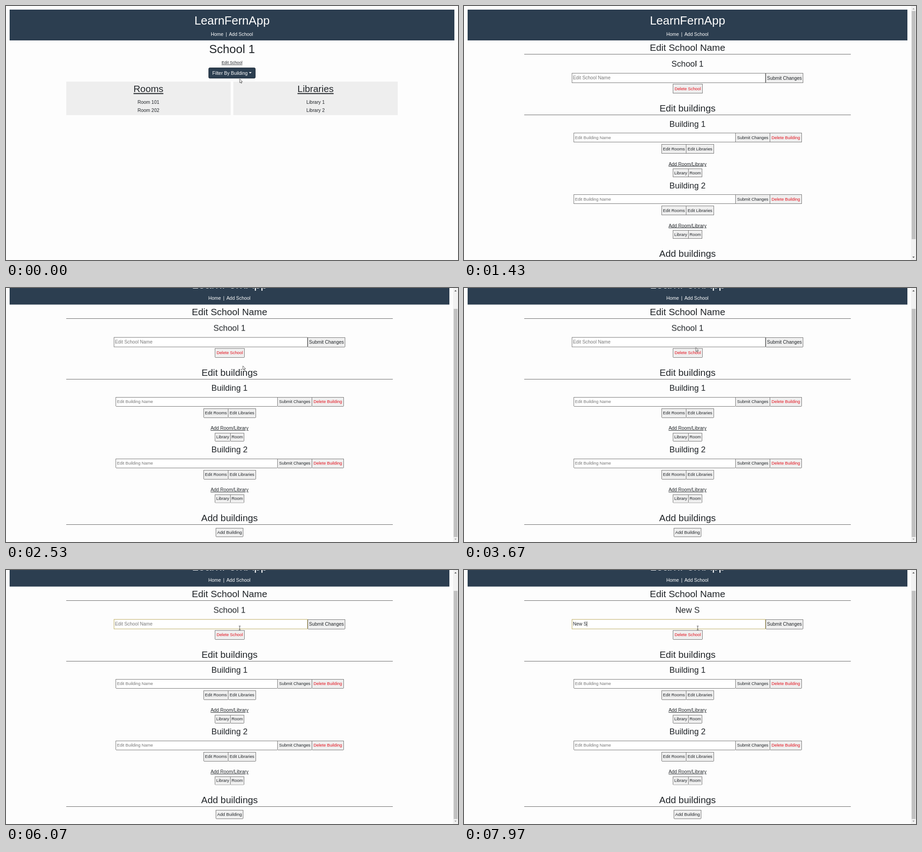
Animation of 998x561 px, one loop 8 s. Source, as an HTML page:

```html
<!DOCTYPE html>
<html lang="en">
<head>
<meta charset="utf-8">
<title>School editor</title>
<style>
  html, body { margin: 0; width: 100%; height: 100%; overflow: hidden; background: #fdfdfd; }
  svg { display: block; }
  text { font-family: "Liberation Sans", Arial, sans-serif; fill: #212529; white-space: pre; }
  .light { fill: #fff; }
  .red { fill: #e3101c; }
  .hint { fill: #757575; }
  .under { text-decoration: underline; }
  .bar { fill: #2c3e50; }
  .panel { fill: #eee; }
  .rule { fill: #666; shape-rendering: crispEdges; }
  .btn, .field { fill: #efefef; stroke: #767676; shape-rendering: crispEdges; }
  .field { fill: #fff; }
  .status text { font-family: "Open Sans", "Noto Sans", sans-serif; fill: #55585c; }

  /* Every part runs on the same 8 s loop. */
  .first, .second, .link, .status, .arrow, .beam, .focus, .blink, .strip, .up, .down {
    animation: 8s step-end infinite;
  }
  .first { animation-name: first; }
  .second { animation-name: second; }
  .link { animation-name: link; }
  .status { animation-name: status; }
  .arrow { animation-name: arrow; }
  .beam { animation-name: beam; }
  .focus { animation-name: focus; }
  .blink { animation-name: blink; }
  .strip { animation-name: type; }
  .up { animation-name: up; }
  .down { animation-name: down; }
  .scroll { animation: scroll 8s ease-in-out infinite; }
  .thumb { animation: thumb 8s ease-in-out infinite; }
  .cursor { animation: move 8s ease-in-out infinite; }

  @keyframes first { 0% { visibility: visible } 16.9%, 100% { visibility: hidden } }
  @keyframes second { 0% { visibility: hidden } 16.9%, 100% { visibility: visible } }
  @keyframes link { 0% { fill: #212529 } 8%, 100% { fill: #c6b588 } }
  @keyframes status { 0% { visibility: hidden } 8.8% { visibility: visible } 16.9%, 100% { visibility: hidden } }
  @keyframes arrow { 0% { opacity: 1 } 8% { opacity: 0 } 30% { opacity: 1 } 46.9%, 100% { opacity: 0 } }
  @keyframes beam { 0% { opacity: 0 } 8% { opacity: 1 } 30% { opacity: 0 } 46.9%, 100% { opacity: 1 } }
  @keyframes focus { 0% { stroke: #767676 } 66.25%, 100% { stroke: #bcaa5c } }
  @keyframes blink { 0% { opacity: 0 } 66.25% { opacity: 1 } 72.5% { opacity: 0 } 78.75%, 100% { opacity: 1 } }
  @keyframes type {
    0% { transform: translateY(0) }
    83.75% { transform: translateY(-40px) }
    86.25% { transform: translateY(-80px) }
    89.4% { transform: translateY(-120px) }
    92.5% { transform: translateY(-160px) }
    96.9%, 100% { transform: translateY(-200px) }
  }
  @keyframes up { 0% { fill: #a3a3a3 } 29.2%, 100% { fill: #505050 } }
  @keyframes down { 0% { fill: #505050 } 31.4%, 100% { fill: #a3a3a3 } }
  @keyframes scroll { 0%, 29.1% { transform: translateY(0) } 31.4%, 100% { transform: translateY(-39.4px) } }
  @keyframes thumb { 0%, 29.1% { transform: translateY(0) } 31.4%, 100% { transform: translateY(35px) } }
  @keyframes move {
    0%, 2.5% { transform: translate(516px, 161px) }
    8.75% { transform: translate(513px, 127px) }
    14%, 17.5% { transform: translate(512.5px, 126px) }
    26.9%, 28% { transform: translate(523px, 170px) }
    31.4%, 38% { transform: translate(523px, 172px) }
    47.5% { transform: translate(511px, 129px) }
    57%, 62% { transform: translate(510.5px, 124px) }
    66.25%, 100% { transform: translate(516px, 128px) }
  }
</style>
</head>
<body>
<svg id="stage" width="998" height="561" viewBox="0 0 998 561"></svg>
<script>
const stage = document.getElementById('stage');
const BODY = 10.4, SMALL = 9.36, H1 = 26, H2 = 20.8, H3 = 18.2;
const typed = ['N', 'Ne', 'New', 'New ', 'New S'];

const rect = (x, y, w, h, cls, more = '') =>
  `<rect x="${x}" y="${y}" width="${w}" height="${h}" class="${cls}" ${more}/>`;
const text = (x, y, size, str, cls = '', anchor = 'start') =>
  `<text x="${x}" y="${y}" font-size="${size}" class="${cls}" text-anchor="${anchor}">${str}</text>`;
const mid = (x, y, size, str, cls) => text(x, y, size, str, cls, 'middle');

// Bordered box given by its outer edges, with a centred label
const button = (x1, y1, x2, y2, label, size = SMALL, cls = '') =>
  rect(x1 + .5, y1 + .5, x2 - x1 - 1, y2 - y1 - 1, 'btn', 'rx="1"') +
  mid((x1 + x2) / 2, (y1 + y2) / 2 + size * .355, size, label, cls);
const field = (x1, y1, x2, y2, cls = '') =>
  rect(x1 + .5, y1 + .5, x2 - x1 - 1, y2 - y1 - 1, 'field ' + cls, 'rx="1"');

const header = (width, cx) =>
  rect(8, 8, width, 68, 'bar') +
  mid(cx, 40.7, H1, 'LearnFernApp', 'light') +
  text(cx - 46.8, 65.5, BODY, 'Home', 'light') +
  mid(cx - 12.7, 65.5, BODY, '|', 'light') +
  text(cx - 6.8, 65.5, BODY, 'Add School', 'light');

const panel = (x, title, rows) =>
  rect(x, 167, 363, 74, 'panel') +
  mid(x + 181.5, 190.4, H2, title, 'under') +
  rows.map((row, i) => mid(x + 181.5, 215.7 + 18.7 * i, BODY, row)).join('');

const schoolPage = () =>
  header(982, 499) +
  mid(499, 104, H1, 'School 1') +
  mid(499, 128.4, 9.1, 'Edit School', 'under link') +
  rect(447.5, 136.5, 103, 23, 'bar', 'rx="2.6" stroke="#25303c"') +
  text(455.5, 151.7, BODY, 'Filter By Building', 'light') +
  '<path d="M536.4 146h6l-3 3z" fill="#fff"/>' +
  panel(133, 'Rooms', ['Room 101', 'Room 202']) +
  panel(502, 'Libraries', ['Library 1', 'Library 2']);

const section = (y, title) =>
  mid(493.5, y, H2, title) + rect(133, y + 7, 721, 1, 'rule');

const building = (n, y) => `<g transform="translate(0 ${y})">` +
  mid(493.5, 266.5, H3, 'Building ' + n) +
  field(242, 280, 600, 301) +
  text(245, 293.8, SMALL, 'Edit Building Name', 'hint') +
  button(599, 280, 676, 301, 'Submit Changes') +
  button(675, 280, 746, 301, 'Delete Building', SMALL, 'red') +
  button(436, 305, 491, 326, 'Edit Rooms') +
  button(490, 305, 552, 326, 'Edit Libraries') +
  mid(493.5, 352.5, BODY, 'Add Room/Library', 'under') +
  button(461, 359, 496, 378, 'Library') +
  button(495, 359, 526, 378, 'Room') + '</g>';

// Stacked states behind a clipping window, stepped one row per keystroke
const strip = (y, h, rows) =>
  `<svg y="${y}" width="998" height="${h}"><g class="strip">${rows.join('')}</g></svg>`;

const nameHeading = () => strip(112, 28,
  ['School 1', ...typed].map((s, i) => mid(493.5, 21.5 + 40 * i, H3, s)));

const nameInput = () => strip(149, 20, [
  text(240.4, 13.3, BODY, 'Edit School Name', 'hint'),
  rect(240, 4, .8, 11, 'blink'),
  ...typed.map((s, i) => text(240.4, 53.3 + 40 * i, BODY, s, 'typed'))
]);

const editPage = () => '<g class="scroll">' +
  header(971, 493.5) +
  section(99.4, 'Edit School Name') +
  nameHeading() +
  field(238, 148, 666, 170, 'focus') +
  nameInput() +
  button(666, 148, 749, 170, 'Submit Changes', BODY) +
  button(461, 172, 527, 193, 'Delete School', SMALL, 'red') +
  section(233.2, 'Edit buildings') +
  building(1, 0) + building(2, 136) +
  section(554, 'Add buildings') +
  button(463, 569, 524, 589, 'Add Building', 9.75) + '</g>' +
  rect(987, 0, 11, 561, '', 'fill="#f1f1f1"') +
  rect(988.5, 11, 8.5, 504, 'thumb', 'fill="#c1c1c1"') +
  '<path class="up" d="M990 7.5h5l-2.5-3z"/><path class="down" d="M990 553.5h5l-2.5 3z"/>';

const status = () => '<g class="status">' +
  '<path d="M-1 546.5H176.5q2.5 0 2.5 2.5V562H-1z" fill="#e2e2e6" stroke="#d2d2d6"/>' +
  text(2.7, 556.7, 7.37, 'https://pure-shore-43581.herokuapp.com/edit/31') + '</g>';

const cursor = () => '<g class="cursor">' +
  '<path class="arrow" d="M0 0V8.6L2 6.8 3.3 9.8 4.6 9.2 3.4 6.4H6z" fill="#fff" stroke="#333" stroke-width=".8"/>' +
  '<path class="beam" d="M-2-4.2H-.6L0-3.7.6-4.2H2M0-3.7V3.7M-2 4.2H-.6L0 3.7.6 4.2H2" fill="none" stroke="#333" stroke-width=".9"/></g>';

stage.innerHTML =
  `<g class="first">${schoolPage()}</g><g class="second">${editPage()}</g>` + status() + cursor();

// Caret follows the end of each typed state
stage.querySelectorAll('.typed').forEach(el => {
  const x = 240.6 + el.getComputedTextLength();
  el.insertAdjacentHTML('afterend', rect(x, el.getAttribute('y') - 9.3, .8, 11, ''));
});
</script>
</body>
</html>
```
